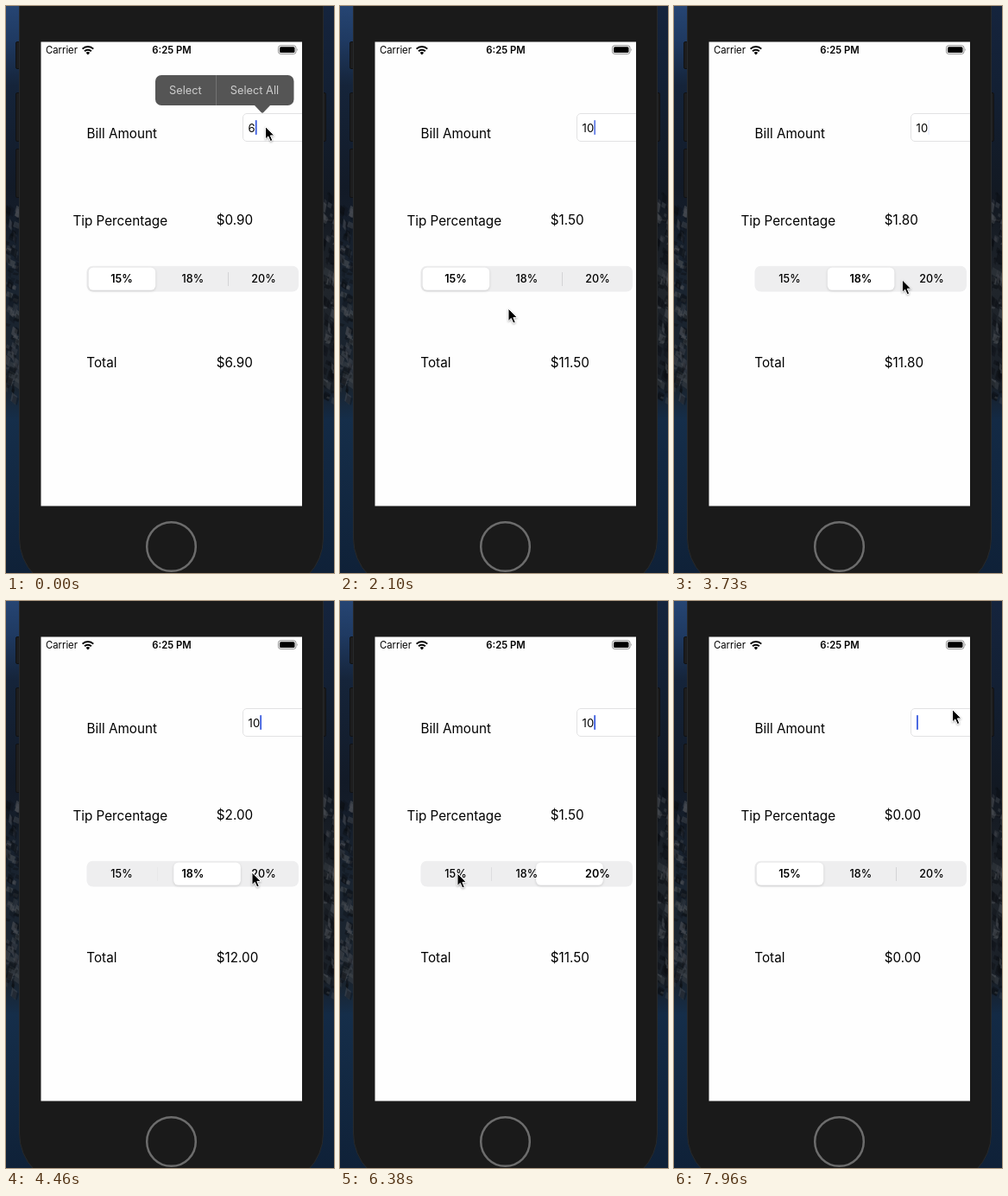
Animation, 380 px wide and 656 px high, one loop 8 s. Source, as an HTML page:

```html
<!DOCTYPE html>
<html lang="en">
<head>
<meta charset="utf-8">
<title>Tip calculator</title>
<style>
  html, body { margin: 0; width: 100%; height: 100%; overflow: hidden; background: #1a1a1a; }
  svg { display: block; width: 380px; height: 656px; font: 15.25px Inter, "Liberation Sans", sans-serif; }
  .status { font-size: 11.3px; }
  .menu { font-size: 12.8px; fill: #cdcdcd; }
  .field { font-size: 13px; }
  .seg text { font-size: 12.6px; font-weight: 500; text-anchor: middle; }
  .seg text.on { font-weight: 600; }
  #pill { filter: drop-shadow(0 1px 1.5px rgba(0, 0, 0, .15)); }
  #mouse { filter: drop-shadow(0 1px 1px rgba(0, 0, 0, .3)); }
</style>
</head>
<body>
<svg viewBox="0 0 380 656">
  <defs>
    <linearGradient id="left" x2="0" y2="1">
      <stop offset="0" stop-color="#264573"/>
      <stop offset=".06" stop-color="#1f3a62"/>
      <stop offset=".14" stop-color="#15243a"/>
      <stop offset=".32" stop-color="#121a27"/>
      <stop offset=".5" stop-color="#1a2430"/>
      <stop offset=".67" stop-color="#1a232d"/>
      <stop offset=".73" stop-color="#152e4a"/>
      <stop offset="1" stop-color="#0f2138"/>
    </linearGradient>
    <linearGradient id="right" x2="0" y2="1">
      <stop offset="0" stop-color="#15243d"/>
      <stop offset=".14" stop-color="#132034"/>
      <stop offset=".34" stop-color="#121821"/>
      <stop offset=".5" stop-color="#20252b"/>
      <stop offset=".67" stop-color="#191f27"/>
      <stop offset=".73" stop-color="#132a45"/>
      <stop offset="1" stop-color="#0f2138"/>
    </linearGradient>
    <clipPath id="screen"><path d="M40.5 41.5h302.5v537h-302.5z"/></clipPath>
  </defs>

  <!-- wallpaper -->
  <path fill="url(#left)" d="M0 0h190v656H0z"/>
  <path fill="url(#right)" d="M190 0h190v656H190z"/>
  <g id="rocks"></g>

  <!-- phone -->
  <g fill="#1d1d1e" stroke="#111213">
    <rect x="11.5" y="41.5" width="7" height="31" rx="1.5"/>
    <rect x="11.5" y="100.5" width="7" height="56" rx="1.5"/>
    <rect x="11.5" y="165.5" width="7" height="56" rx="1.5"/>
    <rect id="side" x="362.5" y="100.5" width="8" height="56" rx="1.5"/>
  </g>
  <rect x="15.5" y="-90" width="352" height="766" rx="60" fill="#1a1a1a" stroke="#27292b"/>
  <circle cx="191.5" cy="625.5" r="28.3" fill="none" stroke="#6c6c6c" stroke-width="2.5"/>

  <g clip-path="url(#screen)">
    <path fill="#fefefe" d="M40 41h304v538H40z"/>
    <g class="status">
      <text x="46" y="55.2">Carrier</text>
      <text x="192" y="55.2" text-anchor="middle" font-weight="600">6:25 PM</text>
    </g>
    <g fill="none" stroke="#000" stroke-width="2">
      <path d="M88.6 49.6a9 9 0 0 1 12.6 0M91 52.3a5.6 5.6 0 0 1 7.8 0"/>
      <path fill="#000" stroke="none" d="M92.6 54a3.3 3.3 0 0 1 4.6 0l-2.3 2.4z"/>
    </g>
    <rect x="315.5" y="45.8" width="20.5" height="9.6" rx="2.6" fill="none" stroke="#8b8b8b"/>
    <rect x="317" y="47.2" width="17.5" height="6.8" rx="1.5"/>
    <path fill="#8b8b8b" d="M337.2 49q1.4 1.6 0 3.2z"/>

    <text x="93.6" y="152.6">Bill Amount</text>
    <text x="77.4" y="253.6">Tip Percentage</text>
    <text x="93.3" y="418.4">Total</text>
    <text id="tip" x="243.8" y="252.8"></text>
    <text id="total" x="243.8" y="418.4"></text>

    <rect x="274.5" y="124.5" width="90" height="32" rx="4.5" fill="#fff" stroke="#e2e2e3"/>
    <text id="bill" class="field" x="280.6" y="145.8"></text>
    <rect id="caret" y="132" width="1.9" height="17" rx=".8" fill="#4262e0"/>

    <g class="seg">
      <rect x="93.5" y="300.7" width="245.5" height="29.8" rx="7" fill="#eeeeef"/>
      <path id="div1" d="M175.5 308v16" stroke="#d3d3d5"/>
      <path id="div2" d="M257.5 308v16" stroke="#d3d3d5"/>
      <rect id="pill" y="302.4" width="77.6" height="26.4" rx="5.6" fill="#fff"/>
      <text x="134" y="320.2">15%</text>
      <text x="216.4" y="320.2">18%</text>
      <text x="298.5" y="320.2">20%</text>
    </g>
  </g>

  <g id="menu">
    <path fill="#555" d="M180 80h146.5a7 7 0 0 1 7 7v21a7 7 0 0 1-7 7H306l-7.6 8q-1.4 1.3-2.8 0l-7.6-8H180a7 7 0 0 1-7-7v-21a7 7 0 0 1 7-7z"/>
    <path stroke="#737373" d="M243.5 80v35"/>
    <g class="menu">
      <text x="189" y="102.3">Select</text>
      <text x="259.8" y="102.3">Select All</text>
    </g>
  </g>

  <path id="mouse" stroke="#fff" d="M0 0V14.5L3.3 11.4 5.8 17 8.3 16 5.9 10.4H10.3Z"/>
</svg>
<script>
const $ = id => document.getElementById(id);
const labels = document.querySelectorAll('.seg text');
const clamp = v => Math.max(0, Math.min(1, v));
const money = v => '$' + v.toFixed(2);

let seed = 7;
const rand = () => (seed = seed * 16807 % 2147483647) / 2147483647;

// Rough cliff texture on both edges of the wallpaper.
function addRocks(x0, top, bottom, count) {
  let html = '';
  for (let i = 0; i < count; i++) {
    const x = x0 + rand() * 15, y = top + rand() * (bottom - top);
    const w = 2 + rand() * 5, h = 2 + rand() * 8;
    const shade = rand() < .65 ? '#0c0f14' : '#4a4e54';
    html += `<path fill="${shade}" opacity="${.25 + rand() * .4}"
      d="M${x} ${y}l${w} ${h / 2} ${-w / 3} ${h} ${-w} ${-h / 2}z"/>`;
  }
  $('rocks').innerHTML += html;
}
addRocks(-2, 225, 455, 110);
addRocks(366, 215, 455, 110);

// Every track is keyed by tick; the picture is held for one tick.
const mousePath = [
  [0, 300.5, 139.5], [10, 300.5, 139.5], [12, 247, 235], [13, 213, 318],
  [14, 195, 350], [16, 204, 327], [18, 207, 322], [22, 207, 322],
  [26, 283.5, 315], [28, 285, 314], [35, 285, 314], [38, 233.5, 306],
  [41, 146, 314], [43, 136, 315], [45, 160, 300], [46, 262, 195],
  [47, 322.5, 125.5], [48, 322.5, 125.5], [50, 364, 128], [52, 322.5, 125.5]
];
const typed = [[0, '6'], [1, ''], [7, '1'], [8, '10'], [52, '1'], [53, '']];
const picks = [[-9, 0], [16, 1], [30, 2], [43, 0]];
const rates = [.15, .18, .20];
const slide = [.2, .82, 1];
const caretX = [281, 288.8, 294.2];

const tickAt = t => Math.floor(
  t < 2400 ? t / 150 : t < 6980 ? 16 + (t - 2391) / 147.6 : 47 + (t - 6980) / 161);

const current = (track, n) => track.filter(k => k[0] <= n).pop();

function along(path, n) {
  const a = current(path, n);
  const b = path[path.indexOf(a) + 1] || a;
  const f = a === b ? 0 : (n - a[0]) / (b[0] - a[0]);
  return [a[1] + (b[1] - a[1]) * f, a[2] + (b[2] - a[2]) * f];
}

function blink(n) {
  if (n < 11 || n > 48) return 1;
  const p = Math.min(n, 47) * 148.6 % 1000;
  return p > 800 ? clamp((p - 890) / 200)
    : Math.min(clamp((p + 90) / 215), clamp(1 - (p - 560) / 170));
}

function draw(n) {
  const [x, y] = along(mousePath, n);
  $('mouse').setAttribute('transform', `translate(${x} ${y})`);
  $('side').setAttribute('x', x > 358 ? 366.5 : 362.5);
  $('menu').style.display = n < 1 ? '' : 'none';

  const bill = current(typed, n)[1];
  $('bill').textContent = bill;
  $('caret').setAttribute('x', caretX[bill.length]);
  $('caret').style.opacity = blink(n);

  const pick = current(picks, n);
  const prev = picks[Math.max(0, picks.indexOf(pick) - 1)][1];
  const age = n - pick[0];
  const pos = prev + (pick[1] - prev) * slide[Math.min(age, 2)];
  $('pill').setAttribute('x', 95.6 + pos * 82.2);
  $('div1').style.opacity = clamp(pos - 1);
  $('div2').style.opacity = clamp(1 - pos);
  const bold = age < 3 ? prev : pick[1];
  labels.forEach((el, i) => el.classList.toggle('on', i === bold));

  const tip = bill * rates[pick[1]];
  $('tip').textContent = money(tip);
  $('total').textContent = money(+bill + tip);
}

const start = performance.now();
let last = -1;
function frame() {
  const n = tickAt((performance.now() - start) % 8000);
  if (n !== last) draw(last = n);
  requestAnimationFrame(frame);
}
frame();
</script>
</body>
</html>
```
